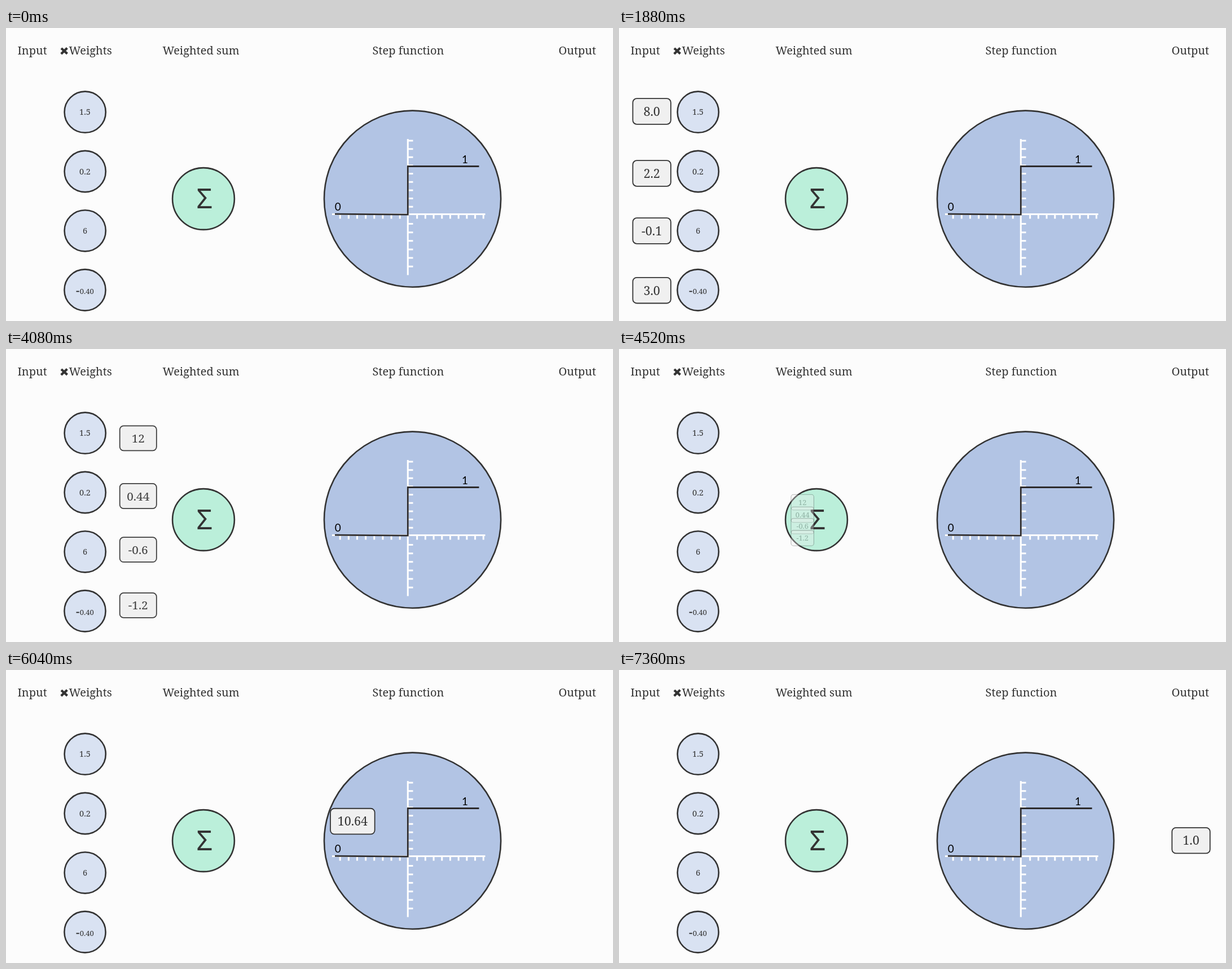
Recreate the animation shown at these times as an HTML page. Size 1076 by 520 pixels, loop 8 s.

```html
<!DOCTYPE html>
<html lang="en">
<head>
<meta charset="utf-8">
<title>Perceptron</title>
<style>
  html, body { margin: 0; width: 100%; height: 100%; overflow: hidden; background: #fcfcfc; }
  svg { display: block; width: 100vw; height: 100vh; }
  text { font-family: "Noto Serif", serif; fill: #333; }
  .head { font-size: 20px; }
  .mid { text-anchor: middle; }
  .weight { font-size: 14.5px; }
  .small { font-size: 13px; }
  .sigma { font: 500 49px "Noto Sans", sans-serif; }
  .level { font: 19px Lato, sans-serif; fill: #000; }
  .node { stroke: #333; stroke-width: 2.6; }
  .card rect { fill: #f0f0f0; stroke: #333; stroke-width: 1.8; }
  .card text { font-size: 21.5px; text-anchor: middle; }
  .axis { stroke: #fff; stroke-width: 3; fill: none; }
  .step { stroke: #2d2b2c; stroke-width: 2.8; fill: none; }
</style>
</head>
<body>
<svg id="stage" viewBox="0 0 1076 520"></svg>
<script>
const LOOP = 8000, TICK = 40;
const ROWS = [148, 258, 360, 465.7];
const SUM = [350, 303];
const stage = document.getElementById("stage");

function add(tag, attrs, parent = stage, label) {
  const el = document.createElementNS("http://www.w3.org/2000/svg", tag);
  for (const key in attrs) el.setAttribute(key, attrs[key]);
  if (label !== undefined) el.textContent = label;
  return parent.appendChild(el);
}

const write = (label, x, y, cls) => add("text", { x, y, class: cls }, stage, label);
const node = (cx, cy, r, fill) => add("circle", { cx, cy, r, fill, class: "node" });

function drawScene() {
  write("Input", 20.5, 47, "head");
  write("Weights", 111.5, 47, "head");
  write("Weighted sum", 345.5, 47, "head mid");
  write("Step function", 713, 47, "head mid");
  write("Output", 1012.7, 47, "head mid");
  add("path", { d: "M98 36L108.6 45.6M108.4 35.6L97.8 46", stroke: "#333", "stroke-width": 4.2 });

  ["1.5", "0.2", "6"].forEach((w, i) => {
    node(140.2, 149.2 + i * 105.3, 36.6, "#d9e2f2");
    write(w, 140, 154.3 + i * 105.3, "weight mid");
  });
  node(140, 465, 36.6, "#d9e2f2");
  write("0.40", 143.3, 472, "small mid");
  add("path", { d: "M124.5 467.5h5.2", stroke: "#222", "stroke-width": 1.8 });

  node(...SUM, 54.9, "#bbefda");
  write("Σ", 351.7, 320, "sigma mid");

  node(720.6, 303.2, 156.6, "#b2c4e4");
  let ticks = "M712.3 197V438.5M578 330.5H849.5";
  const run = (n, from, gap, mark) => {
    for (let i = 0; i < n; i++) ticks += mark(from + i * gap);
  };
  const side = y => `M712 ${y}h9.5`;
  const down = x => `M${x} 331v7.5`;
  run(9, 200, 14.65, side);
  run(6, 347.5, 15.15, side);
  run(8, 592.2, 15.15, down);
  run(9, 728.7, 14.7, down);
  add("path", { d: ticks, class: "axis" });
  add("path", { d: "M583 330.2L712.3 331.2M712.3 332.5V245.5M711 245.5H838.5", class: "step" });
  write("0", 588.3, 323.6, "level mid");
  write("1", 813.6, 239.6, "level mid");
}

function card(label, w = 67.4) {
  const g = add("g", { class: "card" });
  add("rect", { x: -w / 2, y: -22.8, width: w, height: 45.6, rx: 7 }, g);
  add("text", { x: 0, y: 7.8 }, g, label);
  return g;
}

const span = (t, from, to) => Math.min(1, Math.max(0, (t - from) / (to - from)));
const mix = (a, b, p) => a + (b - a) * p;

function place(g, visible, x, y, alpha = 1, scale = 1) {
  g.setAttribute("visibility", visible ? "visible" : "hidden");
  g.setAttribute("transform", `translate(${x} ${y}) scale(${scale})`);
  g.setAttribute("opacity", alpha);
}

drawScene();
const inputs = ["8.0", "2.2", "-0.1", "3.0"].map(s => card(s));
const products = ["12", "0.44", "-0.6", "-1.2"].map(s => card(s));
const total = card("10.64", 78.6);
const output = card("1.0");

// Shrink and fade while a card is absorbed by a node
const absorb = p => [1 - 0.85 * p, 1 - 0.5 * p];

function draw(t) {
  ROWS.forEach((y, i) => {
    const slide = mix(-35.2, 52.3, span(t, 0, 440));
    place(inputs[i], t > 0 && t < 2440,
      mix(slide, 140, span(t, 1840, 2440)), y, ...absorb(span(t, 1900, 2500)));

    const rest = mix(140, 226, span(t, 2290, 2720));
    const pull = span(t, 4040, 4640);
    const [alpha, scale] = absorb(pull);
    place(products[i], t > 2360 && t < 4640,
      mix(rest, SUM[0], pull), mix(y, SUM[1], pull),
      alpha * span(t, 2360, 2540), scale);
  });

  const go = span(t, 5680, 6480);
  place(total, t > 4600 && t < 6480,
    mix(mix(350, 459.2, span(t, 4600, 5160)), 804, go), mix(299.6, 230.6, go),
    span(t, 4600, 4780) * (1 - span(t, 6280, 6500)));

  place(output, t > 6460,
    mix(720.5, 1014, span(t, 6460, 7360)), 302.6, span(t, 6460, 6640));
}

const start = performance.now();
function frame() {
  const t = (performance.now() - start) % LOOP;
  draw(Math.floor(t / TICK) * TICK);
  requestAnimationFrame(frame);
}
draw(0);
requestAnimationFrame(frame);
</script>
</body>
</html>
```
